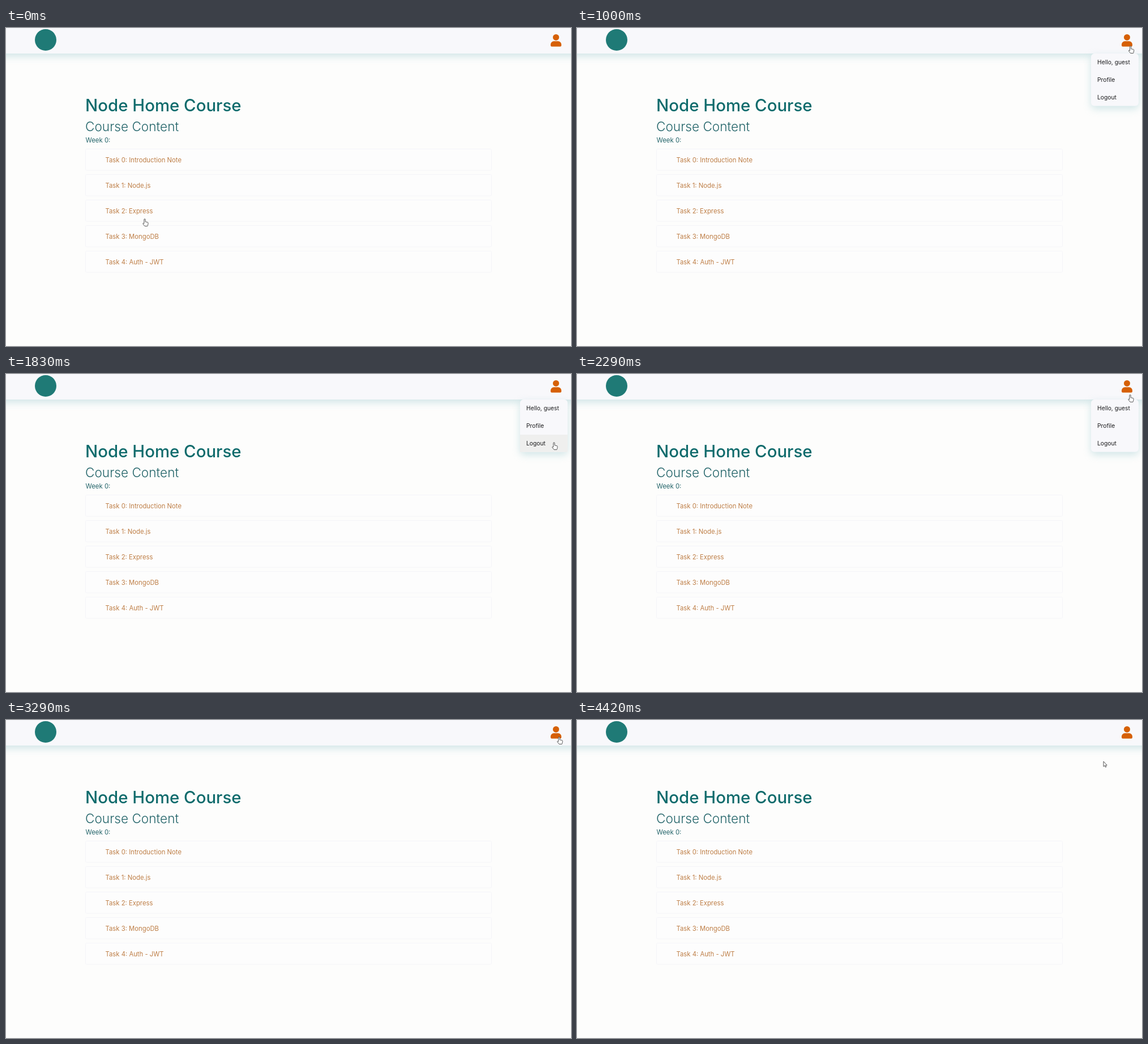
Write an HTML page that moves like this. It is 998x561 px and loops after 4460 ms.

```html
<!DOCTYPE html>
<html lang="en">
<head>
<meta charset="utf-8">
<title>Course page</title>
<style>
  html, body { margin: 0; width: 100%; height: 100%; overflow: hidden; background: #fdfdfc; }
  svg { display: block; width: 998px; height: 561px; font-family: Inter, "Open Sans", sans-serif; }
  .panel { fill: #f8f8fb; filter: drop-shadow(0 5px 7px rgba(115, 180, 190, .32)); }
  .title { font-size: 29.4px; font-weight: 500; fill: #0f6b6c; }
  .subtitle { font-size: 22.6px; font-weight: 300; fill: #24656a; }
  .week { font-size: 11.4px; fill: #24656a; }
  .task text { font-size: 11.3px; fill: #be7e46; }
  .task rect { fill: #fdfdfd; stroke: #f5f5f9; }
  .menu text { font-size: 10.3px; fill: #1c1c1e; }
  .cursor path { fill: #fff; stroke: #444; stroke-width: .9; stroke-linejoin: round; }
</style>
</head>
<body>
<svg viewBox="0 0 998 561">
  <rect class="panel" x="-30" y="-20" width="1058" height="65"/>
  <circle cx="70" cy="21" r="19" fill="#1f7a76"/>
  <g fill="#d66005">
    <circle cx="971.5" cy="16.4" r="5.5"/>
    <path d="M962 30.7v-1.6a5.8 5.8 0 0 1 5.8-5.8h7.4a5.8 5.8 0 0 1 5.8 5.8v1.6a2 2 0 0 1-2 2h-15a2 2 0 0 1-2-2z"/>
  </g>
  <text class="title" x="140" y="146.5">Node Home Course</text>
  <text class="subtitle" x="140" y="181.5">Course Content</text>
  <text class="week" x="140.5" y="202">Week 0:</text>
  <g id="tasks"></g>
  <g id="menu" class="menu">
    <rect class="panel" x="908" y="45" width="84" height="92.5" rx="6"/>
    <rect id="highlight" x="908" width="84" height="30.5" fill="#efefee"/>
    <text x="919" y="64">Hello, guest</text>
    <text x="919" y="95">Profile</text>
    <text x="919" y="126">Logout</text>
  </g>
  <g id="cursor" class="cursor">
    <path id="arrow" d="M0 0v9.2l2.1-1.9 1.4 3 1.4-.7-1.3-2.8h2.6z"/>
    <path id="hand" d="M-1.1 .9a1.1 1.1 0 0 1 2.2 0v3.9l4 .9q1.2 .4 1 1.7l-.5 3.2-.7 1.9h-4.9l-3.4-4.4q.3-1.5 2.3-.1z"/>
  </g>
</svg>
<script>
const LOOP = 4460;
const byId = id => document.getElementById(id);
const show = (id, on) => byId(id).setAttribute("visibility", on ? "visible" : "hidden");
const inside = (p, x, y, w, h) => p.x > x && p.x < x + w && p.y > y && p.y < y + h;

const tasks = ["Introduction Note", "Node.js", "Express", "MongoDB", "Auth - JWT"];
const rowTop = i => 213.5 + i * 45;
byId("tasks").innerHTML = tasks.map((name, i) => `<g class="task">
  <rect x="140.5" y="${rowTop(i)}" width="717" height="37.5" rx="2"/>
  <text x="175.5" y="${rowTop(i) + 23}">Task ${i}: ${name}</text></g>`).join("");

const task = { x: 245, y: 337 }, corner = { x: 943, y: 4 }, icon = { x: 978, y: 28 };
const profile = { x: 973, y: 88 }, profileEdge = { x: 972, y: 104 }, logout = { x: 968, y: 121 };
const aside = { x: 955, y: 76 }, away = { x: 930, y: 73 };

// The pointer eases from stop to stop; every arrival at the icon toggles the menu.
const stops = [
  [0, task], [560, corner], [930, icon], [1380, profile], [1830, logout], [2400, icon],
  [2880, aside], [3350, icon], [3830, profileEdge], [4130, icon], [4420, away], [LOOP, away]
];

function pointerAt(t) {
  const i = stops.findIndex(([time]) => time > t);
  const [t0, a] = stops[i - 1], [t1, b] = stops[i];
  const u = (t - t0) / (t1 - t0), k = u * u * (3 - 2 * u);
  return { x: a.x + (b.x - a.x) * k, y: a.y + (b.y - a.y) * k };
}

function draw(now) {
  const t = now % LOOP;
  const p = pointerAt(t);
  const clicks = stops.filter(([time, place]) => place === icon && time <= t).length;
  const open = clicks % 2 === 1;
  const inMenu = open && inside(p, 908, 45, 84, 92.5);
  const onIcon = inside(p, 960, 8, 24, 37);
  const onTask = tasks.some((_, i) => inside(p, 140, rowTop(i), 718, 37.5));
  const hand = inMenu || onIcon || onTask;

  show("menu", open);
  show("highlight", inMenu && p.y > 76.5);
  byId("highlight").setAttribute("y", p.y < 107 ? 76.5 : 107);
  show("hand", hand);
  show("arrow", !hand);
  byId("cursor").setAttribute("transform", `translate(${p.x} ${p.y})`);
}

const start = performance.now();
function tick() {
  draw(performance.now() - start);
  requestAnimationFrame(tick);
}
tick();
</script>
</body>
</html>
```
